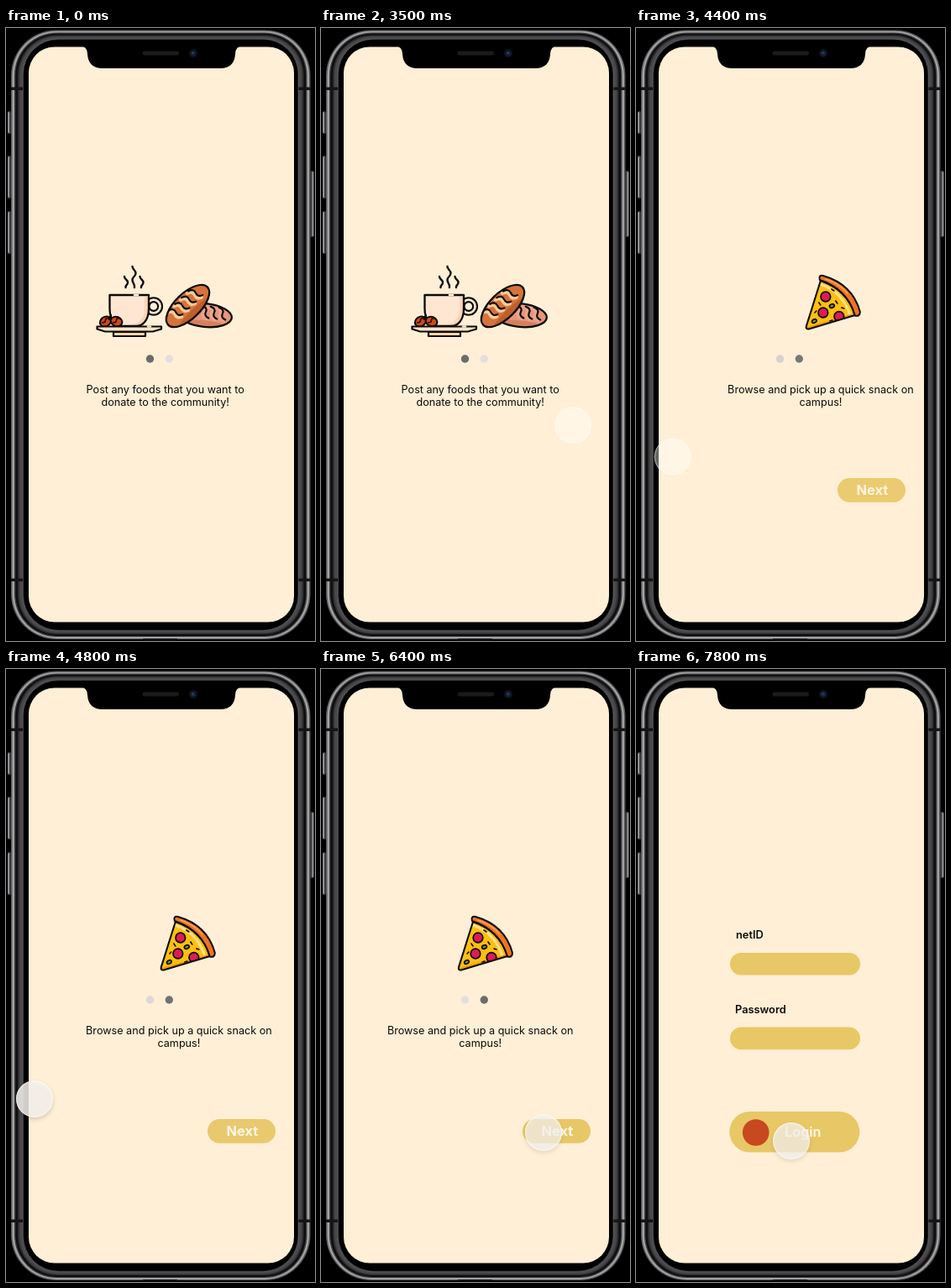
These frames come from a looping animation (368x730 px, 8000 ms). An HTML page with a canvas:

```html
<!DOCTYPE html>
<html lang="en">
<head>
<meta charset="utf-8">
<title>Food sharing onboarding</title>
<style>
html, body { margin: 0; width: 100%; height: 100%; overflow: hidden; background: #000; }
canvas { display: block; width: 368px; height: 730px; }
</style>
</head>
<body>
<canvas id="stage"></canvas>
<script>
const W = 368, H = 730, LOOP = 8000;
const canvas = document.getElementById('stage');
const ctx = canvas.getContext('2d');
const dpr = window.devicePixelRatio || 1;
canvas.width = W * dpr;
canvas.height = H * dpr;

const CREAM = '#feefd6', GOLD = '#e8c766', INK = '#0b0909';
const FONT = 'Inter, Roboto, sans-serif';

const clamp = v => Math.max(0, Math.min(1, v));
const span = (t, a, b) => clamp((t - a) / (b - a));
const mix = (a, b, k) => a + (b - a) * k;
const quad = u => u < .5 ? 2 * u * u : 1 - 2 * (1 - u) ** 2;
const cubic = u => u < .5 ? 4 * u ** 3 : 1 - 4 * (1 - u) ** 3;

function shape(path, fill, stroke, lw = 2) {
  const p = typeof path === 'string' ? new Path2D(path) : path;
  if (fill) { ctx.fillStyle = fill; ctx.fill(p); }
  if (stroke) { ctx.strokeStyle = stroke; ctx.lineWidth = lw; ctx.stroke(p); }
}
function box(x, y, w, h, r) {
  const p = new Path2D();
  p.roundRect(x, y, w, h, r);
  return p;
}
function disc(x, y, r) {
  const p = new Path2D();
  p.arc(x, y, r, 0, 7);
  return p;
}
function oval(x, y, rx, ry, a = 0) {
  const p = new Path2D();
  p.ellipse(x, y, rx, ry, a, 0, 7);
  return p;
}
function text(str, x, y, size, weight = 400, color = '#0c0a09', align = 'center') {
  ctx.font = `${weight} ${size}px ${FONT}`;
  ctx.textAlign = align;
  ctx.fillStyle = color;
  ctx.fillText(str, x, y);
}
// Draws in a saved state with a horizontal shift and an opacity.
function layer(dx, alpha, draw) {
  if (alpha <= 0) return;
  ctx.save();
  ctx.translate(dx, 0);
  ctx.globalAlpha *= alpha;
  draw();
  ctx.restore();
}

function drawCup() {
  const puff = 'c0 3.5 4 3.5 4 7s-3 3-2.5 6';
  ['M150.5 284c0 4 4 4 4 8s-4 4-4 8 3 4 2.5 9', 'M141 296' + puff, 'M159.5 296' + puff]
    .forEach(d => shape(d, null, INK, 2.4));
  const handle = disc(175.8, 331.5, 7.8);
  shape(handle, null, INK, 7);
  shape(handle, null, '#ffe6d3', 2.8);
  const cup = 'M123.5 318H170V334c0 14-7 21-15 21H139c-8 0-15.5-7-15.5-21Z';
  shape(cup, '#ffe6d3');
  shape('M165 320h4v14c0 13-6 20-14 20h-12c15 0 22-8 22-20Z', '#fbd5b4');
  shape(cup, null, INK, 2.3);
  shape('M153 318h4', null, '#ffe6d3', 2.6);
  for (const [x, a] of [[118.5, -.6], [131.5, .35]]) {
    shape(oval(x, 349.5, 7, 5.6, a), '#d34a13', INK, 2);
    shape(`M${x - 4} 351q4 0 4-3t4-2`, null, '#2b0a03', 1.7);
  }
  shape('M125 342l-2 5', null, INK, 2.2);
  shape('M108.5 355.5H185v3l-10 3H118l-9.5-3Z', '#fde3c6', INK, 2.2);
  shape('M128 362H166V367H128Z', '#f8d3ab', INK, 2.2);
  shape('M169 355.5h3', null, '#fde3c6', 2.6);
}

function drawLoaf(x, y, angle, rx, ry, crust, shade, cream, cuts) {
  ctx.save();
  ctx.translate(x, y);
  ctx.rotate(angle);
  const body = oval(0, 0, rx, ry);
  shape(body, crust);
  ctx.save();
  ctx.clip(body);
  shape(oval(0, ry * .95, rx, ry * .5), shade);
  for (const cx of cuts) {
    const curve = `q7 2 5 ${ry * .5}t4 ${ry * .5}`;
    shape(`M${cx - 5} ${-ry + 4}${curve}`, null, cream, 4);
    shape(`M${cx - 2.4} ${-ry + 3}${curve}`, null, INK, 2.2);
  }
  ctx.restore();
  shape(body, null, INK, 2.3);
  ctx.restore();
}

function drawFood() {
  drawCup();
  drawLoaf(237, 342, .1, 32, 14, '#e5967a', '#d5805e', '#eba68a', [-2, 8, 18]);
  drawLoaf(216.5, 331, -.77, 32.5, 15.2, '#d6733b', '#bd5f2a', '#f6cd96', [-18, -7, 4, 15]);
}

function drawPizza() {
  const cheese = new Path2D('M181 301Q213 312 222 342L167 358.5Q163 359 164 355Z');
  shape(cheese, '#fdbf10');
  ctx.save();
  ctx.clip(cheese);
  shape('M181 305Q209 315 217 345', null, '#fde08a', 3);
  shape('M164 359L222 342', null, '#f19a12', 5);
  for (const [x, y] of [[187, 320], [184, 339], [203, 343.5]]) {
    shape(disc(x, y, 5.8), '#dc1d55', INK, 1.7);
  }
  for (const [x, y, a] of [[173.5, 349, -.5], [194.5, 331, -.4]]) {
    shape(oval(x, y, 3, 2.1, a), '#7c9b24', INK, 1.7);
  }
  shape('M179 327l2 3M199 325l2 3M206 333l3 1M176 337l-2 2M192 349l3-1M194 311l3 2', null, INK, 1.6);
  ctx.restore();
  shape(cheese, null, INK, 2.1);
  shape('M180 300Q178 294 184 295Q219 305 228 338Q228 344 222 342.5Q213 311 180 300Z', '#ec7424', INK, 2);
  shape('M187 299Q203 304 213 316', null, '#f9a45a', 1.5);
}

function drawDots(k) {
  const from = [107, 107, 105], to = [228, 223, 220];
  const tone = p => `rgb(${from.map((v, i) => Math.round(mix(v, to[i], p)))})`;
  shape(disc(171.5, 394, 4.7), tone(k));
  shape(disc(194.3, 394, 4.7), tone(1 - k));
}

function caption(top, bottom) {
  text(top, 189.7, 435, 12.63);
  text(bottom, 189.7, 450.4, 12.63);
}

function drawIntro(k) {
  if (k < 1) {
    layer(-340 * k, 1, () => {
      drawFood();
      caption('Post any foods that you want to', 'donate to the community!');
    });
  }
  if (k > 0) {
    layer(352 * (1 - k), 1, drawPizza);
    layer(274 * (1 - k), clamp(k * 4), () =>
      caption('Browse and pick up a quick snack on', 'campus!'));
    layer(0, k, () => {
      shape(box(240, 536, 81, 28.7, 14.3), GOLD);
      text('Next', 281.3, 556.3, 16.4, 700, '#fffaf0');
    });
  }
  drawDots(k);
}

function drawLogin() {
  text('netID', 119, 321, 12.8, 600, '#0c0a09', 'left');
  shape(box(112, 338, 155, 26.5, 13.2), GOLD);
  text('Password', 118, 409.6, 12.8, 600, '#0c0a09', 'left');
  shape(box(112, 426.6, 155, 26.6, 13.3), GOLD);
  shape(box(111.3, 527, 155, 48.6, 24.3), GOLD);
  shape(disc(142.7, 552, 15.8), '#c8481f');
  text('Login', 198.8, 557, 16.2, 600, '#fffaf0');
}

// Outline of the case, moved inward; the bands are thinner at top and bottom.
function rim(inset) {
  const dy = inset * .75;
  return box(6 + inset, 2.5 + dy, 356.5 - 2 * inset, 725.5 - 2 * dy, 54 - inset * .85);
}

function drawBody() {
  ctx.fillStyle = '#000';
  ctx.fillRect(0, 0, W, H);
  for (const [y, h] of [[99, 27], [152, 51], [218, 51]]) {
    shape(box(2, y, 4, h, 1.5), '#3a3a3c');
    shape(box(2.2, y + 1, 1.8, h - 2, .9), '#9c9c9e');
  }
  shape(box(362.5, 170, 4, 79, 1.5), '#3a3a3c');
  shape(box(364.5, 171, 1.8, 77, .9), '#9c9c9e');

  const bands = [
    [0, '#5c5c5e'], [1.5, '#a2a2a4'], [4, '#39393b'], [5.5, '#0d0d0e'],
    [8, '#2f2f31'], [10, '#48484a'], [13, '#555557'], [14.5, '#1a1a1b'], [15.5, '#000']
  ];
  for (const [inset, color] of bands) shape(rim(inset), color);
  ctx.fillStyle = '#151516';
  for (const y of [70.5, 655.5]) {
    ctx.fillRect(6, y, 14, 3.5);
    ctx.fillRect(348.5, y, 14, 3.5);
  }
  ctx.fillRect(163, 727, 41, 2);
}

function drawNotch() {
  shape('M88 21Q97 22 97 31Q98 48 115 48H255Q272 48 273 31Q273 22 282 21Z', '#000');
  shape(box(162.5, 27.5, 43.5, 5, 2.5), '#1b1b1c');
  shape(disc(223, 30, 5), '#10131a');
  shape(disc(223, 30, 2.6), '#14294b');
  shape(disc(222.4, 29.4, 1), '#2b4c7c');
}

// Each move: start, end, from x/y, to x/y, easing, sideways bow.
const MOVES = [
  [2400, 3200, 269, 667, 300, 473, quad, 0],
  [3650, 4600, 300, 473, 34, 512, cubic, 0],
  [4820, 6350, 34, 512, 265, 552, quad, 6.5],
  [6820, 7720, 265, 552, 185, 562, quad, 0]
];
function touchAt(t) {
  let m = MOVES[0];
  for (const n of MOVES) if (t >= n[0]) m = n;
  const [a, b, x0, y0, x1, y1, ease, bow] = m;
  const k = ease(span(t, a, b));
  return { x: mix(x0, x1, k), y: mix(y0, y1, k) + bow * Math.sin(Math.PI * k) };
}
const pressAt = t =>
  span(t, 3420, 3490) - span(t, 4650, 4850) +
  .45 * (span(t, 6330, 6400) - span(t, 6600, 6750) + span(t, 7740, 7800));

function drawTouch(t) {
  if (t < 2400) return;
  const { x, y } = touchAt(t), press = pressAt(t);
  ctx.save();
  ctx.shadowColor = `rgba(60,45,30,${.3 * (1 - press)})`;
  ctx.shadowBlur = 5 * dpr;
  ctx.shadowOffsetY = 2.5 * dpr;
  shape(disc(x, y, 22), `rgba(${mix(246, 255, press)},${mix(241, 255, press)},${mix(238, 252, press)},${.97 - .57 * press})`);
  ctx.restore();
  shape(disc(x, y, 21.4), null, `rgba(255,253,249,${.6 - .2 * press})`, 1.2);
}

function swipeAt(t) {
  if (t < 3650) return 0;
  const drag = (300 - touchAt(Math.min(t, 4700)).x) / 288;
  return mix(drag, 1, quad(span(t, 4700, 5000)));
}

function draw(t) {
  ctx.setTransform(dpr, 0, 0, dpr, 0, 0);
  ctx.lineCap = ctx.lineJoin = 'round';
  drawBody();
  const screen = box(27, 22.5, 316, 685, 31);
  shape(screen, CREAM);
  ctx.save();
  ctx.clip(screen);
  const fade = quad(span(t, 6420, 6720));
  layer(0, 1 - fade, () => drawIntro(swipeAt(t)));
  layer(0, fade, drawLogin);
  ctx.restore();
  drawNotch();
  drawTouch(t);
}

const start = performance.now();
function tick(now) {
  draw(Math.max(0, now - start) % LOOP);
  requestAnimationFrame(tick);
}
draw(0);
requestAnimationFrame(tick);
</script>
</body>
</html>
```
